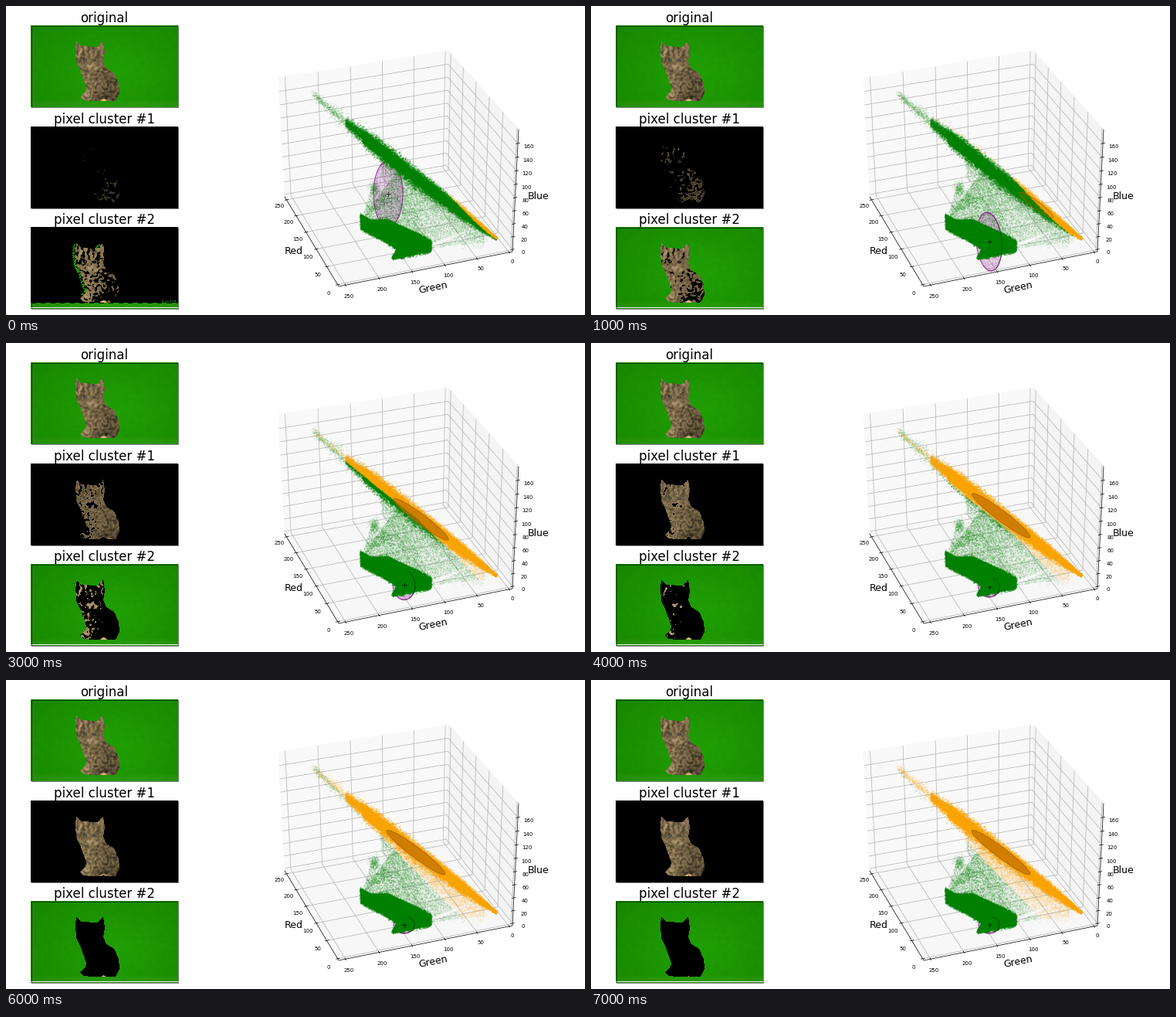
These frames come from a looping animation (750x400 px, 8 s). A matplotlib script:

```python
import numpy as np
import matplotlib.pyplot as plt
from matplotlib.animation import FuncAnimation
from matplotlib.collections import LineCollection
from matplotlib.patches import Ellipse, Polygon, Rectangle
from matplotlib.path import Path

plt.rcParams["font.family"] = "DejaVu Sans"
rng = np.random.default_rng(4)
PT = 0.72  # points per pixel at 100 dpi
GREEN, ORANGE = (0, 0.5, 0), (0.98, 0.64, 0)

fig = plt.figure(figsize=(7.5, 4), dpi=100, facecolor="white")
ax = fig.add_axes([0, 0, 1, 1])
ax.axis("off")


def logistic(t):
    return 1 / (1 + np.exp(-t))


# ---------- 3D box ----------
CORNERS = {
    (1, 1, 0): (361, 247), (0, 1, 0): (431, 363), (0, 0, 0): (656, 318),
    (1, 0, 0): (570, 209), (1, 1, 1): (353, 93), (1, 0, 1): (573, 58),
    (0, 0, 1): (664, 160),
}


def fit_camera():
    rows, rhs = [], []
    for p, (x, y) in CORNERS.items():
        h, p = [*p, 1], np.array(p)
        rows += [[*h, 0, 0, 0, 0, *(-x * p)], [0, 0, 0, 0, *h, *(-y * p)]]
        rhs += [x, y]
    m = np.linalg.lstsq(np.array(rows, float), np.array(rhs, float), rcond=None)[0]
    return np.append(m, 1).reshape(3, 4)


CAMERA = fit_camera()


def proj(r, g, b):
    x, y, w = CAMERA @ [r, g, b, 1]
    return x / w, y / w


def pane(grey, *corners):
    ax.add_patch(Polygon([CORNERS[c] for c in corners], fc=str(grey), ec=str(grey),
                         lw=0.8, zorder=0))


pane(0.975, (1, 1, 0), (1, 0, 0), (1, 0, 1), (1, 1, 1))
pane(0.955, (0, 0, 0), (1, 0, 0), (1, 0, 1), (0, 0, 1))
pane(0.97, (0, 0, 0), (1, 0, 0), (1, 1, 0), (0, 1, 0))

grid, ticks = [], []
e = 0.012


def label(pos, dx, dy, value):
    ax.text(pos[0] + dx, pos[1] + dy, str(value), size=5, ha="center", va="center")


for v in range(0, 251, 50):
    t = (v + 5) / 265
    grid.append([proj(t, 1, 0), proj(t, 0, 0), proj(t, 0, 1)])
    grid.append([proj(0, t, 0), proj(1, t, 0), proj(1, t, 1)])
    ticks.append([proj(t, 1 - e, 0), proj(t, 1 + e, 0)])
    ticks.append([proj(-e, t, 0), proj(e, t, 0)])
    label(proj(t, 1, 0), 3.5 * t - 12.5, 11.5 - 4 * t, v)
    label(proj(0, t, 0), 4, 12 + 2.5 * t, v)
for v in range(0, 161, 20):
    t = (v + 3.7) / 183.7
    grid.append([proj(1, 1, t), proj(1, 0, t), proj(0, 0, t)])
    ticks.append([proj(0, -e, t), proj(0, e, t)])
    label(proj(0, 0, t), 14, 4, v)

ax.add_collection(LineCollection(grid, colors="#b0b0b0", linewidths=0.5, zorder=1))
ax.add_collection(LineCollection(ticks, colors="black", linewidths=0.5, zorder=1.2))
ax.plot(*zip(*[CORNERS[c] for c in [(1, 1, 0), (0, 1, 0), (0, 0, 0), (0, 0, 1)]]),
        color="black", lw=0.5, zorder=1.2)
ax.text(373, 321, "Red", size=9, ha="center", zorder=8)
ax.text(690, 250.5, "Blue", size=9, ha="center", zorder=8)
ax.text(553, 364.5, "Green", size=9, ha="center", va="center", rotation=11.3, zorder=8)


# ---------- point cloud ----------
def axis_y(x):
    return np.interp(x, [397, 445, 530, 635], [114, 155, 222, 301])


def half(x):
    return np.interp(x, [397, 480, 530, 600, 635], [3, 11, 11.5, 7, 2])


def triangle(a, b, c, n):
    w = rng.dirichlet([1, 1, 1], n)
    return w @ np.array([a, b, c], float)


def dots(xy, diameter, z):
    return ax.scatter(*xy.T, s=(diameter * PT) ** 2, linewidths=0, zorder=z)


def tint(is_orange, alpha):
    rgb = np.where(is_orange[:, None], ORANGE, GREEN)
    return np.c_[rgb, np.broadcast_to(alpha, len(rgb))]


cx = np.interp(rng.random(20000), [0, 0.012, 0.07, 0.87, 0.985, 1],
               [396, 440, 462, 595, 628, 636])
cs = np.clip(rng.normal(0, 0.5, cx.size), -1.4, 1.4)
cigar = np.c_[cx, axis_y(cx) + cs * half(cx)]
cigar_alpha = np.interp(cx, [396, 440, 470], [0.08, 0.18, 0.36])

sx = rng.uniform(485, 620, 2600)
fx = rng.uniform(398, 625, 1800)
haze = np.vstack([
    np.c_[sx, axis_y(sx) + half(sx) + rng.exponential(12, sx.size)],
    np.c_[fx, axis_y(fx) + rng.normal(0, 0.9, fx.size) * half(fx)],
    rng.normal((477, 235), (3.5, 4), (200, 2)),
    triangle((462, 274), (474, 232), (505, 250), 700),
    triangle((462, 274), (505, 215), (550, 305), 4000),
    triangle((505, 215), (550, 308), (612, 285), 2600),
    triangle((550, 314), (612, 285), (625, 305), 500),
])
haze = haze[haze[:, 1] < 314]
haze_d = haze[:, 1] - axis_y(haze[:, 0])
haze_alpha = np.interp(haze[:, 0], [500, 620], [0.15, 0.08])

BLOB = np.array([
    (459, 270), (470, 277), (495, 277), (530, 293), (550, 304), (549, 318),
    (515, 325), (500, 326), (507, 315), (490, 304), (460, 289)], float)
ax.add_patch(Polygon(BLOB, fc=GREEN, ec=GREEN, lw=0.5, zorder=4))
side = rng.integers(0, len(BLOB), 900)
mix = rng.random((900, 1))
rim = BLOB[side] * mix + np.roll(BLOB, -1, 0)[side] * (1 - mix)
dots(rim + rng.normal(0, 0.8, rim.shape), 1.8, 4).set_facecolor((*GREEN, 0.5))

haze_dots = dots(haze, 1.5, 3)
cigar_dots = dots(cigar, 1.8, 5)

# ---------- ellipsoids ----------
shell = Polygon([(0, 0), (1, 1), (2, 0)], fc=(0.5, 0, 0.5, 0.16), ec=(0.5, 0, 0.5, 0.8),
                lw=0.7, zorder=3.5)
ax.add_patch(shell)
wires = LineCollection([], colors=[(0.5, 0, 0.5, 0.25)], linewidths=0.4, zorder=3.6)
ax.add_collection(wires)
arc, = ax.plot([], [], color="black", lw=0.6, alpha=0.5, zorder=4.5)
cross, = ax.plot([], [], "+", color="black", ms=4.5, mew=0.6, alpha=0.85, zorder=7)
amber = Ellipse((0, 0), 1, 1, angle=37, lw=0.7, zorder=6)
ax.add_patch(amber)

TURN = np.linspace(0, 2 * np.pi, 60)


def oval(x, y, rx, ry, lean, turn=TURN):
    dy = ry * np.sin(turn)
    return np.c_[x + rx * np.cos(turn) + lean * dy, y + dy]


def draw_shell(k):
    # A first guess, then a jump to the blob and a shrinking fit
    if k == 0:
        x, y, rx, ry, lean = 495, 243, 19, 43, 0
    else:
        fade = np.exp(-0.3 * (k - 1) ** 2)
        x, y, rx = 515.5, 317 - 12 * fade, 13.5 + 3 * fade
        ry, lean = 11 + 27 * fade, 0.07 * fade
    shell.set_xy(oval(x, y, rx, ry, lean))
    lines = [oval(x, y, rx * f, ry, lean) for f in (0.85, 0.6, 0.25)]
    for a in np.linspace(-1.3, 1.3, 10):
        dy = ry * np.sin(a)
        lines.append(oval(x + lean * dy, y + dy, rx * np.cos(a), 0.25 * rx * np.cos(a), 0))
    wires.set_segments(lines)
    arc.set_data(*oval(x, y, rx, ry, lean, np.linspace(-1.1, 1.1, 20)).T)
    arc.set_visible(k > 0)
    cross.set_data([x], [y])


def draw_amber(k):
    early = logistic(3.5 * (2.5 - k))
    x = 531 + 46 * early
    amber.set(center=(x, axis_y(x) + 0.5), width=94 - 40 * early, height=13.5 - 4 * early,
              visible=k > 0, facecolor=(0.75, 0.43, 0, 0.7 - 0.55 * early ** 4),
              edgecolor=(0.65, 0.38, 0, 0.8))


# ---------- kitten picture ----------
W, H = 191, 106
yy, xx = np.mgrid[:H, :W].astype(float)
OUTLINE = [
    (59, 21), (66, 27), (86, 28), (94, 21), (96, 35), (94, 47), (98, 56), (108, 62),
    (114, 75), (115, 88), (110, 98), (80, 98), (68, 97), (64, 92), (71, 86), (72, 80),
    (64, 58), (59, 48), (58, 32)]
cat = Path(OUTLINE).contains_points(np.c_[xx.ravel() + 0.5, yy.ravel() + 0.5]).reshape(H, W)


def cloud(passes):
    """Smooth random field with unit spread."""
    a = rng.normal(size=(H, W))
    for _ in range(passes):
        for axis in (0, 1):
            a = (np.roll(a, 1, axis) + a + np.roll(a, -1, axis)) / 3
    return a / a.std()


def shade(t, dark, light):
    return np.array(dark) + np.clip(t, 0, 1)[..., None] * (np.array(light) - dark)


def make_picture():
    glow = 1 - np.hypot((xx - 105) / 170, (yy - 62) / 120) + 0.03 * cloud(3)
    img = shade(glow, (22, 128, 0), (32, 160, 3))
    img += np.clip((yy - 95) / 6, 0, 1)[..., None] * (12, 5, 10)

    bend = cloud(8)
    head = 0.52 + 0.17 * np.sin(0.9 * (xx - 76) + bend) * (yy < 40)
    body = 0.6 - 0.008 * (xx - 70) \
        + 0.13 * np.sin(0.5 * yy + 0.3 * xx + 2 * bend)
    tone = np.where((yy < 54) & (xx < 97), head, body) + 0.08 * cloud(1) + 0.06 * cloud(4)
    fur = shade(tone, (40, 34, 22), (190, 163, 115))

    def spot(x, y, rx, ry, color):
        near = np.clip(1.6 - 1.3 * np.hypot((xx - x) / rx, (yy - y) / ry), 0, 0.9)[..., None]
        fur[:] = fur * (1 - near) + near * np.array(color)

    spot(62.5, 29, 2, 4, (140, 110, 85))
    spot(91, 29, 2, 4, (140, 110, 85))
    spot(76, 52, 5, 3, (175, 152, 115))
    for x, y in ((70, 44.5), (82, 45)):
        spot(x, y, 2.6, 1.8, (52, 48, 40))
        spot(x, y, 1.2, 1, (90, 112, 120))
    spot(76, 50, 1.6, 1.2, (120, 80, 66))
    spot(94, 97, 4, 2.6, (238, 192, 132))
    img[cat] = fur[cat]
    return np.clip(img, 0, 255) / 255


picture = make_picture()
rank = np.zeros((H, W))
order = np.argsort(np.argsort(picture[cat].mean(1)))
rank[cat] = order / order.size
speck = rng.random((H, W))
floor = yy >= 98 + 0.8 * np.sin(0.5 * xx)
floor |= (yy > 94) & (xx > 168) & (speck > 0.7)
fringe = np.roll(cat, -4, 1) & ~cat & (yy < 88) & (speck > 0.35)


def masks(k):
    first = cat & (rank < logistic(1.5 * (k - 1.9)))
    if k == 0:
        return first, (rank > 0.45) | (~cat & floor) | fringe
    return first, ~first


def panel(i, title):
    top = round(25 + 130.6 * i)
    ax.text(127.5, top - 4.2, title, size=12, ha="center")
    ax.add_patch(Rectangle((32.5, top + 0.5), W - 1, H - 1, fill=False, lw=0.5,
                           alpha=0.7, zorder=3))
    return ax.imshow(picture, extent=(32, 32 + W, top + H, top), aspect="auto",
                     interpolation="nearest", zorder=2)


panel(0, "original")
panel_1 = panel(1, "pixel cluster #1")
panel_2 = panel(2, "pixel cluster #2")
ax.set_xlim(0, 750)
ax.set_ylim(400, 0)


def draw(k):
    first, second = masks(k)
    panel_1.set_data(picture * first[..., None])
    lower = picture * second[..., None]
    lower[H - 2] = 0.95
    panel_2.set_data(lower)

    # Orange sweeps up from the dark end and spreads down across the cloud
    cut = np.maximum(0.8 * k - 2.1, 0.03 * (cx - 613 + 30 * k))
    cigar_dots.set_facecolors(tint(cs < cut, cigar_alpha))
    cut = 8 * k - 18 + 0.25 * (haze[:, 0] - 550)
    haze_dots.set_facecolors(tint(haze_d < cut, haze_alpha))
    draw_shell(k)
    draw_amber(k)
    return []


anim = FuncAnimation(fig, draw, frames=8, interval=1000, repeat=True, repeat_delay=0)
plt.show()
```
